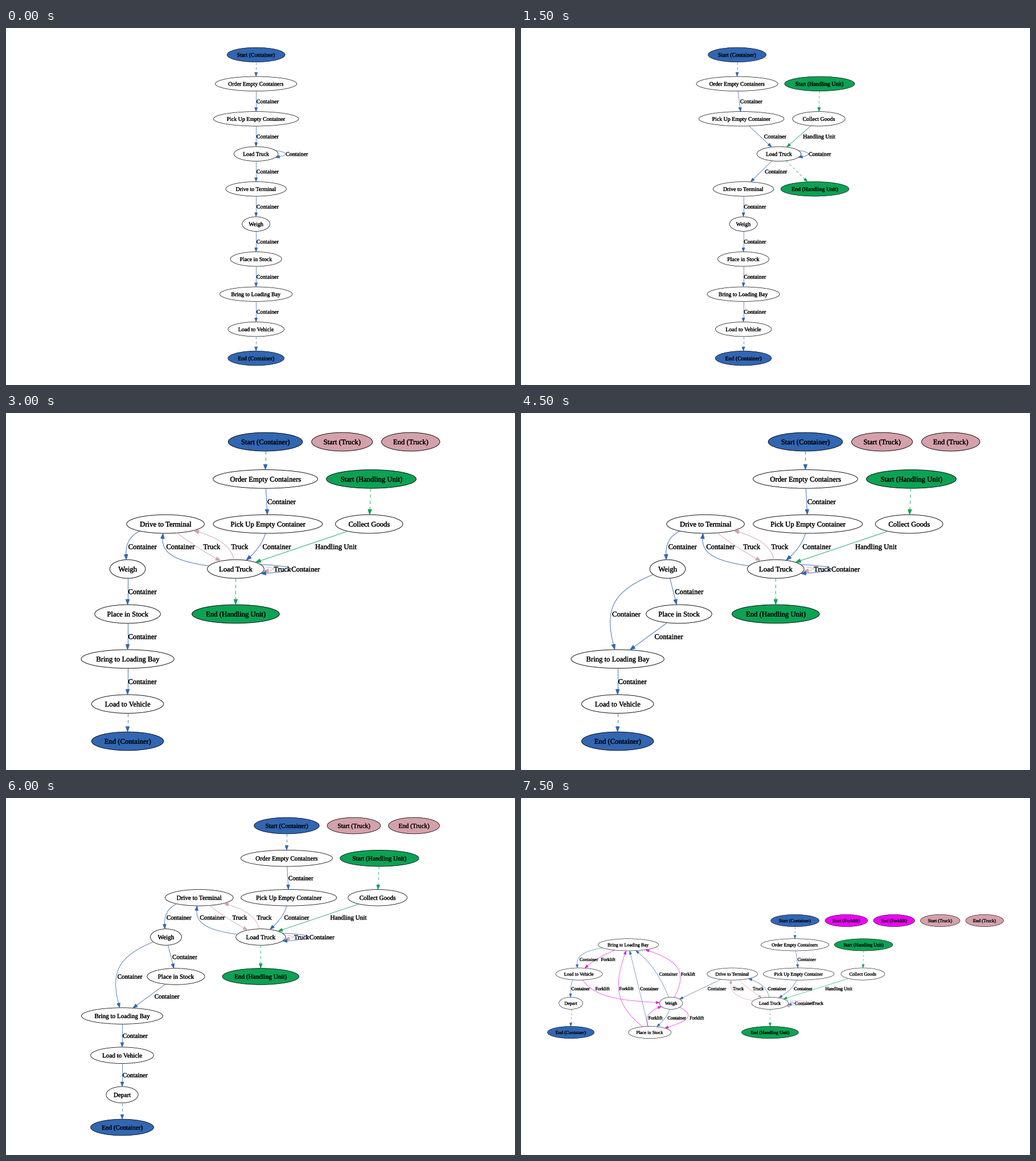
A matplotlib script for the animation above (8 s loop, 894x626 px).

```python
import numpy as np
import matplotlib.pyplot as plt
from matplotlib import patheffects
from matplotlib.animation import FuncAnimation
from matplotlib.patches import Ellipse, Polygon

W, H, DPI = 894, 626, 64
PT = 72 / DPI             # font points per pixel
FIT_W, FIT_H = 801, 557.6  # room for a graph on the stage

# Graph measures, in graph points
RY, FONT, ARROW = 18, 14, 10
GAP, LABEL_GAP = 72, 87   # row distance without and with edge labels
LOOP, LOOP_LABEL = 18, 55

COLORS = {"c": "#3166b2", "h": "#0ba254", "t": "#d4a1ab", "f": "#ee00f8"}
LABELS = {"c": "Container", "h": "Handling Unit", "t": "Truck", "f": "Forklift"}

# key: (text, half width)
NODES = {
    "start_c": ("Start (Container)", 72), "end_c": ("End (Container)", 69.7),
    "start_h": ("Start (Handling Unit)", 87), "end_h": ("End (Handling Unit)", 84.7),
    "start_t": ("Start (Truck)", 59), "end_t": ("End (Truck)", 56.5),
    "start_f": ("Start (Forklift)", 63.6), "end_f": ("End (Forklift)", 61.4),
    "order": ("Order Empty Containers", 101.3),
    "pick": ("Pick Up Empty Container", 105.8),
    "collect": ("Collect Goods", 65.3),
    "load": ("Load Truck", 54.9),
    "drive": ("Drive to Terminal", 75.3),
    "weigh": ("Weigh", 34.5),
    "place": ("Place in Stock", 63.7),
    "bring": ("Bring to Loading Bay", 90),
    "vehicle": ("Load to Vehicle", 69.7),
    "depart": ("Depart", 35.4),
}

# Where an edge turns, as shares of the way across and along
STRAIGHT, SIDE, RISE, DROP = (0.5, 0.5), (1.18, 0.17), (0.04, 0.7), (0.14, 0.52)

fig = plt.figure(figsize=(W / DPI, H / DPI), dpi=DPI, facecolor="white")
ax = fig.add_axes([0, 0, 1, 1])
ax.set_xlim(0, W)
ax.set_ylim(H, 0)
ax.axis("off")


def bezier(p0, p1, p2, p3):
    t = np.linspace(0, 1, 800)[:, None]
    return ((1 - t) ** 3 * p0 + 3 * t * (1 - t) ** 2 * p1
            + 3 * t ** 2 * (1 - t) * p2 + t ** 3 * p3)


def bend(a, b, corner):
    """Curve between two centers that leans towards a corner point."""
    q = a + (b - a) * corner
    return bezier(a, a + 0.8 * (q - a), b + 0.8 * (q - b), b)


def loop(c, reach, spread):
    far = reach * 4 / 3
    return bezier(c - (0, spread), c + (far, -spread),
                  c + (far, spread), c + (0, spread))


def outside(pts, center, rx, ry):
    d = (pts - center) / (rx, ry)
    return np.hypot(d[:, 0], d[:, 1]) >= 1


def layout(rows):
    """Stack the rows, then scale and center the graph on the stage."""
    bare = [all("_" in k for k in row) for row in rows]
    pos, y = {}, 0
    for i, row in enumerate(rows):
        if i:
            y += GAP if bare[i] or bare[i - 1] else LABEL_GAP
        pos.update({k: np.array([x, y], float) for k, x in row.items()})
    left = min(p[0] - NODES[k][1] for k, p in pos.items())
    right = max(p[0] + NODES[k][1] for k, p in pos.items())
    right = max(right, pos["load"][0] + NODES["load"][1] + LOOP + LOOP_LABEL)
    unit = min(FIT_W / (right - left), FIT_H / (y + 2 * RY))
    mid = np.array([(left + right) / 2, y / 2])
    return unit, {k: (p - mid) * unit + (W / 2, H / 2) for k, p in pos.items()}


def build(rows, edges):
    """Draw one graph and return its artists, hidden."""
    unit, pos = layout(rows)
    lw, ry = unit * PT, RY * unit
    art = []

    def text(x, y, s, ha):
        art.append(ax.text(
            x, y + 0.35 * FONT * unit, s, fontsize=FONT * lw, ha=ha,
            family="Liberation Serif", va="baseline", color="black", zorder=4,
            path_effects=[patheffects.withStroke(linewidth=0.3 * lw,
                                                 foreground="black")]))

    for key, p in pos.items():
        name, rx = NODES[key]
        fill = COLORS[key[-1]] if "_" in key else "none"
        art.append(ax.add_patch(Ellipse(p, 2 * rx * unit, 2 * ry, fc=fill,
                                        ec="black", lw=lw, zorder=2)))
        text(*p, name, "center")

    for link, kind, shape in edges:
        a, b = link.split(">")
        rxa, rxb = NODES[a][1] * unit, NODES[b][1] * unit
        if a == b:
            reach, spread = shape
            pts = loop(pos[a], rxa + reach * unit, spread * ry)
            at, slant = len(pts) // 2, 0
        else:
            pts = bend(pos[a], pos[b], shape)
            at = np.argmin(abs(pts[:, 1] - (pos[a][1] + pos[b][1]) / 2))
            dx, dy = pts[at + 1] - pts[at - 1]
            slant = abs(dx / dy)
        # a label keeps clear of a slanting line by half its height
        spot = pts[at] + ((1 + 8 * slant) * unit, 0)

        pts = pts[outside(pts, pos[a], rxa, ry) & outside(pts, pos[b], rxb, ry)]
        tip = pts[-1]
        pts = pts[np.hypot(*(pts - tip).T) >= ARROW * unit]
        base = pts[-1]
        side = (tip - base)[::-1] * (-0.35, 0.35)
        dashed = "_" in link
        art.extend(ax.plot(*pts.T, color=COLORS[kind], lw=lw, zorder=3,
                           ls=(0, (6, 6)) if dashed else "-"))
        art.append(ax.add_patch(Polygon([base + side, tip, base - side],
                                        fc=COLORS[kind], ec=COLORS[kind],
                                        lw=lw, joinstyle="miter", zorder=3)))
        if not dashed:
            text(*spot, LABELS[kind], "left")

    for item in art:
        item.set_visible(False)
    return art


def chain(kind, names):
    """Straight edges through the named nodes."""
    keys = names.split()
    return [(f"{a}>{b}", kind, STRAIGHT) for a, b in zip(keys, keys[1:])]


def column(names, x):
    return [{k: x} for k in names.split()]


# Containers only, then with handling units
WAY = "start_c order pick load drive weigh place bring vehicle end_c"
way = chain("c", WAY) + [("load>load", "c", (LOOP, 0.62))]
goods = chain("h", "start_h collect load end_h")

goods_rows = [
    {"start_c": -104}, {"order": -104, "start_h": 101},
    {"pick": -93.3, "collect": 99}, {"load": 0},
    {"drive": -88.4, "end_h": 89.2},
] + column("weigh place bring vehicle end_c", -88.4)

# With trucks
truck_rows = [
    {"start_c": 57.5, "start_t": 206, "end_t": 339},
    {"order": 57.5, "start_h": 262.6},
    {"drive": -136, "pick": 62.2, "collect": 258.5},
    {"weigh": -209.4, "load": 0},
]
inbound = chain("c", "start_c order pick") + goods + [
    ("pick>load", "c", DROP),
    ("drive>load", "t", (0.45, 0.55)),
]
truck_edges = inbound + [
    ("drive>weigh", "c", SIDE),
    ("load>drive", "t", RISE),
    ("load>drive", "c", SIDE),
    ("load>load", "t", (LOOP, 0.34)),
    ("load>load", "c", (52, 0.53)),
]
bypass = truck_edges + chain("c", "weigh place bring") + [
    ("weigh>bring", "c", (1.42, 0.28)),
]


def truck_graph(place, rest, x):
    return truck_rows + [{"place": place, "end_h": 0}] + column(rest, x)


# With forklifts
forklift_rows = [
    {"start_c": 74.2, "start_f": 227.7, "end_f": 370, "start_t": 507.5, "end_t": 640},
    {"bring": -423, "order": 74.2, "start_h": 279},
    {"vehicle": -569.7, "drive": -112.6, "pick": 85.5, "collect": 277},
    {"depart": -594.3, "weigh": -295.3, "load": 0},
    {"end_c": -594.3, "place": -359, "end_h": 0},
]
forklift_edges = inbound + chain("c", "drive weigh") + [
    ("load>drive", "c", RISE),
    ("load>drive", "t", SIDE),
    ("load>load", "c", (LOOP, 0.34)),
    ("load>load", "t", (70, 0.53)),
    ("bring>vehicle", "c", SIDE),
    ("bring>vehicle", "f", (0.7, 0.45)),
    ("vehicle>depart", "c", SIDE),
    ("vehicle>weigh", "f", (0.15, 0.9)),
    ("weigh>place", "c", DROP),
    ("weigh>place", "f", (-1.6, 0.5)),
    ("weigh>bring", "c", (0.35, 0.65)),
    ("weigh>bring", "f", (-0.56, 0.7)),
    ("place>weigh", "f", (-0.4, 0.7)),
    ("place>bring", "c", STRAIGHT),
    ("place>bring", "f", (2, 0.37)),
] + chain("c", "depart end_c")

scenes = [
    build(column(WAY, 0), way),
    build(goods_rows, way + goods),
    build(truck_graph(-209.4, "bring vehicle end_c", -209.4),
          truck_edges + chain("c", "weigh place bring vehicle end_c")),
    build(truck_graph(-187.4, "bring vehicle end_c", -306.3),
          bypass + chain("c", "bring vehicle end_c")),
    build(truck_graph(-187.4, "bring vehicle depart end_c", -306.3),
          bypass + chain("c", "bring vehicle depart end_c")),
    build(forklift_rows, forklift_edges),
]


def show(frame):
    """Each graph holds for three ticks of 500 ms, the last for one."""
    for i, art in enumerate(scenes):
        for item in art:
            item.set_visible(i == frame // 3)
    return []


anim = FuncAnimation(fig, show, frames=16, interval=500, repeat=True,
                     repeat_delay=0, init_func=lambda: show(0), blit=False)
plt.show()
```
